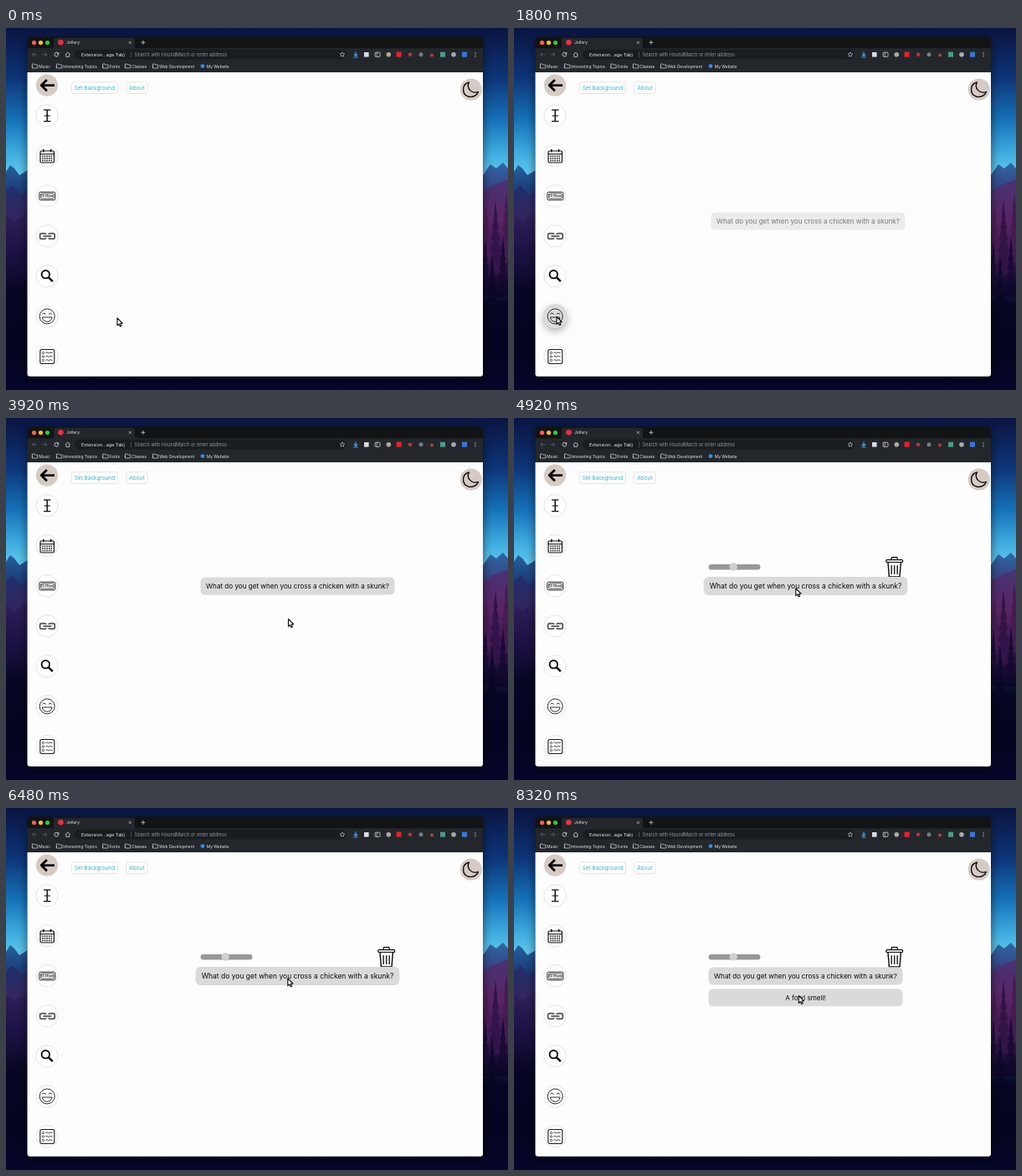
An HTML page with a canvas that plays this animation: 600 by 433 pixels, repeating every 8.36 s.

```html
<!DOCTYPE html>
<html lang="en">
<head>
<meta charset="utf-8">
<title>New tab board</title>
<style>
html, body { margin: 0; width: 100%; height: 100%; overflow: hidden; background: #04041f; }
canvas { display: block; width: 600px; height: 433px; }
</style>
</head>
<body>
<canvas id="stage"></canvas>
<script>
const W = 600, H = 433, LOOP = 8360, STEP = 40;
const dpr = window.devicePixelRatio || 1;
const canvas = document.getElementById('stage');
canvas.width = W * dpr;
canvas.height = H * dpr;
const screen = canvas.getContext('2d');
const backdrop = document.createElement('canvas');
backdrop.width = canvas.width;
backdrop.height = canvas.height;
let c = backdrop.getContext('2d');

const SIDE_X = 49, SMILE_Y = 345;
const FONT = 'Inter, "Liberation Sans", sans-serif';

// ---------- helpers ----------
const clamp = v => Math.max(0, Math.min(1, v));
const ease = v => { v = clamp(v); return v * v * (3 - 2 * v); };
const ramp = (t, from, to) => ease((t - from) / (to - from));

function rect(x, y, w, h, color) {
  c.fillStyle = color;
  c.fillRect(x, y, w, h);
}
function round(x, y, w, h, r) {
  c.beginPath();
  c.roundRect(x, y, w, h, r);
}
function fill(color) { c.fillStyle = color; c.fill(); }
function stroke(color, width) {
  c.strokeStyle = color;
  c.lineWidth = width;
  c.stroke();
}
function circle(x, y, r) {
  c.beginPath();
  c.arc(x, y, r, 0, Math.PI * 2);
}
function dot(x, y, r, color) { circle(x, y, r); fill(color); }
function path(points, color, width) {
  c.beginPath();
  for (let i = 0; i < points.length; i += 2) c.lineTo(points[i], points[i + 1]);
  stroke(color, width);
}
function poly(points, color) {
  c.beginPath();
  for (let i = 0; i < points.length; i += 2) c.lineTo(points[i], points[i + 1]);
  c.closePath();
  fill(color);
}
function text(str, x, y, size, color, align = 'left', weight = 400) {
  c.font = `${weight} ${size}px ${FONT}`;
  c.textAlign = align;
  c.textBaseline = 'alphabetic';
  c.fillStyle = color;
  c.fillText(str, x, y);
}
function shadow(color, blur, dy) {
  c.shadowColor = color;
  c.shadowBlur = blur * dpr;
  c.shadowOffsetY = dy * dpr;
}
function gradient(y0, y1, stops) {
  const g = c.createLinearGradient(0, y0, 0, y1);
  for (const [at, color] of stops) g.addColorStop((at - y0) / (y1 - y0), color);
  return g;
}

// ---------- wallpaper ----------
function pine(x, top, h, w, color) {
  const tiers = 6;
  for (let i = 0; i < tiers; i++) {
    const y = top + h * i / (tiers + 1), half = w * (i + 1.4) / tiers / 2;
    poly([x, y - 2, x + half, y + h / tiers * 1.2, x - half, y + h / tiers * 1.2], color);
  }
}
function wallpaper() {
  rect(0, 0, W, H, gradient(0, H, [
    [0, '#0a1440'], [60, '#0d3578'], [110, '#1672b8'], [150, '#3fade0'],
    [175, '#62c6ea'], [200, '#3a6aa8'], [H, '#04041f']]));
  for (let i = 0; i < 14; i++) {
    const x = (i * 7.3) % 25 + (i % 2) * 573;
    dot(x, 8 + (i * 37) % 80, 0.3, 'rgba(200,225,255,.6)');
  }
  poly([0, 172, 5, 164, 10, 168, 16, 176, 26, 170, 26, 300, 0, 300],
    gradient(162, 240, [[162, '#24639f'], [195, '#1c3c78'], [240, '#2c2560']]));
  poly([0, 196, 8, 188, 18, 200, 26, 194, 26, 320, 0, 320],
    gradient(188, 300, [[188, '#1f2f6b'], [225, '#33265f'], [300, '#120b36']]));
  poly([0, 224, 10, 231, 26, 220, 26, 350, 0, 350],
    gradient(220, 330, [[220, '#30205a'], [265, '#1d1245'], [330, '#05051f']]));
  poly([570, 176, 579, 163, 586, 168, 594, 161, 600, 168, 600, 300, 570, 300],
    gradient(160, 240, [[160, '#2b69a6'], [195, '#3a3f80'], [240, '#4a2866']]));
  poly([570, 196, 582, 188, 600, 181, 600, 320, 570, 320],
    gradient(181, 310, [[181, '#473475'], [230, '#5a2463'], [310, '#1a0c38']]));
  pine(574, 218, 70, 15, '#4a1d59');
  pine(598, 198, 90, 17, '#451a55');
  pine(585, 208, 95, 20, '#32144a');
  pine(573, 255, 70, 14, '#1e0d3a');
  pine(594, 252, 76, 17, '#190b35');
  pine(581, 274, 60, 14, '#110a2f');
  rect(0, 292, W, H - 292, gradient(292, H, [
    [292, 'rgba(6,5,32,0)'], [332, '#060523'], [380, '#04041f'], [H, '#05062a']]));
}

// ---------- browser ----------
function folder(x, y) {
  path([x, y + 5, x, y, x + 2.4, y, x + 3.2, y + 1, x + 6.4, y + 1, x + 6.4, y + 5, x, y + 5, x, y + 2], '#c6c9cc', 0.75);
}
function navIcons() {
  const y = 31.7;
  path([37, y, 31.7, y], '#62676c', 0.8);
  path([34, y - 2.3, 31.7, y, 34, y + 2.3], '#62676c', 0.8);
  path([43.5, y, 48.7, y], '#62676c', 0.8);
  path([46.4, y - 2.3, 48.7, y, 46.4, y + 2.3], '#62676c', 0.8);
  c.beginPath();
  c.arc(60.4, y, 2.4, 0.2, Math.PI * 1.75);
  stroke('#d4d7da', 0.85);
  poly([63.2, 28.7, 63.2, 31.5, 60.5, 31.5], '#d4d7da');
  path([71, 31.8, 73.8, 29, 76.6, 31.8], '#d4d7da', 0.85);
  path([71.9, 31.4, 71.9, 34.4, 75.7, 34.4, 75.7, 31.4], '#d4d7da', 0.8);
}
function star(x, y, r) {
  const pts = [];
  for (let i = 0; i <= 10; i++) {
    const a = -Math.PI / 2 + i * Math.PI / 5, d = i % 2 ? r * 0.45 : r;
    pts.push(x + Math.cos(a) * d, y + Math.sin(a) * d);
  }
  path(pts, '#d4d7da', 0.6);
}
function extensionIcons() {
  const y = 31.8;
  path([418, 28.6, 418, 33.2], '#4ba3f2', 1.2);
  path([415.8, 31.4, 418, 33.5, 420.2, 31.4], '#4ba3f2', 1.1);
  path([415.2, 35, 420.8, 35], '#4ba3f2', 0.9);
  rect(428, 29, 5.6, 5.6, '#d9dcdf');
  round(441.2, 29.2, 5.8, 5.2, 0.8);
  stroke('#d4d7da', 0.8);
  path([443.2, 29.2, 443.2, 34.4], '#d4d7da', 0.7);
  dot(457.3, y, 2.8, '#b3a7a0');
  round(466.6, 28.5, 6, 6.2, 0.8);
  fill('#e3222f');
  dot(483, y, 2.3, '#b9333b');
  dot(496, y, 2.5, '#777c82');
  dot(509, y + 0.6, 2, '#a7453f');
  rect(519, 28.7, 6, 6, '#4d9b86');
  dot(535, y, 2.8, '#a9adb1');
  rect(545, 28.7, 6, 6, '#3976d8');
  for (let i = -1; i <= 1; i++) dot(561, y + i * 2.1, 0.6, '#d4d7da');
}
function browser() {
  shadow('rgba(0,0,0,.55)', 12, 4);
  round(25.5, 10.5, 544.5, 406.3, 4);
  fill('#141619');
  shadow('transparent', 0, 0);

  c.save();
  round(25.5, 10.5, 544.5, 406.3, [4, 4, 3, 3]);
  c.clip();
  rect(25, 10, 546, 14.5, '#111315');
  round(57, 11.8, 97, 14, [3, 3, 0, 0]);
  fill('#23272b');
  rect(25, 24.2, 546, 29, '#23272b');
  round(82, 25.7, 325, 12, 6);
  fill('#1a1d20');
  rect(25, 53, 546, 365, '#fdfdfd');
  c.restore();

  ['#f95f56', '#fbbd2e', '#2bc840'].forEach((col, i) => dot(33.5 + i * 8, 17.6, 2.6, col));
  dot(65.4, 17.3, 3.3, '#e5304b');
  text('Jotlery', 72, 19.2, 4.9, '#e6e8ea');
  path([146.8, 15.9, 149.8, 18.9], '#d4d7da', 0.7);
  path([149.8, 15.9, 146.8, 18.9], '#d4d7da', 0.7);
  path([161.4, 17.3, 166.4, 17.3], '#d4d7da', 0.8);
  path([163.9, 14.8, 163.9, 19.8], '#d4d7da', 0.8);

  navIcons();
  text('Extension...age Tab)', 90, 33.7, 5.45, '#eceef0');
  rect(149.2, 28.5, 0.6, 6.6, '#666b70');
  text('Search with HoundMarch or enter address', 153.6, 33.7, 5.5, '#9097a0');
  star(402, 31.8, 3);
  extensionIcons();

  const marks = [['Music', 31], ['Interesting Topics', 60], ['Fonts', 115.3],
    ['Classes', 142], ['Web Development', 175]];
  for (const [label, x] of marks) {
    folder(x + 0.4, 43);
    text(label, x + 8.2, 47.5, 4.85, '#e3e6e8');
  }
  dot(235, 45.6, 2.4, '#2f8fe6');
  text('My Website', 239.8, 47.5, 4.85, '#e3e6e8');
}

// ---------- page ----------
function button(label, x, w) {
  round(x, 64.7, w, 13.8, 2.6);
  fill('#fff');
  stroke('#dadada', 0.7);
  text(label, x + w / 2, 74, 6.45, '#2fb4c6', 'center');
}
const icons = {
  105() {
    path([45, 98, 53.4, 98], '#111', 1.3);
    path([45, 111.6, 53.4, 111.6], '#111', 1.3);
    path([49.2, 98, 49.2, 111.6], '#111', 1.5);
    path([45.6, 105, 52.8, 105], '#111', 1.1);
  },
  153() {
    round(41, 147, 16.4, 14, 1.4);
    stroke('#111', 1.2);
    path([41, 150.8, 57.4, 150.8], '#111', 1.1);
    for (const x of [44.8, 53.6]) path([x, 144.9, x, 148.4], '#111', 1.5);
    for (let r = 0; r < 3; r++)
      for (let k = 0; k < 5; k++) rect(43.1 + k * 2.6, 152.6 + r * 2.6, 1.6, 1.6, '#222');
  },
  201() {
    round(39.8, 196.2, 19, 9.6, 1.4);
    stroke('#222', 1);
    round(41.6, 198, 15.4, 6, 0.8);
    stroke('#222', 0.8);
    text('12:00 pm', 49.3, 202.3, 3.2, '#000', 'center', 700);
  },
  249() {
    round(40.6, 245.8, 7.2, 6.4, 2);
    stroke('#636363', 2);
    round(51, 245.8, 7.2, 6.4, 2);
    stroke('#636363', 2);
    rect(45.4, 247.1, 8, 3.8, '#fff');
    path([44.4, 249, 54.4, 249], '#636363', 1.9);
  },
  297() {
    circle(47.3, 294.7, 4.7);
    stroke('#0a0a0a', 1.9);
    path([50.9, 298.3, 55.8, 303.2], '#0a0a0a', 2.5);
  },
  345() {
    circle(49.2, 344.9, 9);
    stroke('#2a2a2a', 1);
    for (const x of [45.5, 52.9]) {
      c.beginPath();
      c.arc(x, 343.2, 2, Math.PI * 1.1, Math.PI * 1.9);
      stroke('#222', 0.95);
    }
    c.beginPath();
    c.moveTo(43.4, 346);
    c.lineTo(55, 346);
    c.bezierCurveTo(54.5, 353, 43.9, 353, 43.4, 346);
    c.closePath();
    stroke('#222', 0.95);
  },
  393() {
    round(40.8, 384.5, 17, 17, 2.2);
    stroke('#1c1c1c', 1.1);
    for (let i = 0; i < 3; i++) {
      const y = 388.6 + i * 4.4;
      circle(44.4, y, 1.2);
      stroke('#222', 0.75);
      path([47.3, y, 49, y - 0.8, 50.7, y + 0.5, 52.4, y - 0.5, 55.6, y], '#222', 0.85);
    }
  }
};
function sideIcon(y) {
  circle(SIDE_X, y - 0.2, 13.2);
  fill('#fff');
  stroke('#dedede', 0.8);
  icons[y]();
}
function page() {
  dot(SIDE_X, 68.6, 13.1, '#d6cbc4');
  path([58, 68.6, 43, 68.6], '#050505', 2.7);
  path([48.9, 62, 42.2, 68.6, 48.9, 75.2], '#050505', 2.8);
  dot(555.8, 73.5, 13.1, '#d6cbc4');
  c.beginPath();
  c.moveTo(553.4, 65);
  c.bezierCurveTo(544.5, 67, 544, 80, 553.5, 82.2);
  c.bezierCurveTo(558.5, 83.2, 563, 80.4, 564.4, 76.4);
  c.bezierCurveTo(556.5, 79.2, 549.8, 72, 553.4, 65);
  c.closePath();
  stroke('#0c0c0c', 1.4);
  button('Set Background', 78.4, 55);
  button('About', 143.8, 25.3);
  for (const y of Object.keys(icons)) sideIcon(+y);
}

// ---------- moving parts ----------
function smileHover(k) {
  if (k <= 0) return;
  c.save();
  c.globalAlpha = k;
  shadow('rgba(0,0,0,.28)', 9, 4);
  dot(SIDE_X + 0.2, SMILE_Y - 0.4, 14.4, '#dcdcdc');
  shadow('transparent', 0, 0);
  icons[SMILE_Y]();
  c.restore();
}
function bubble(label, x, y, alpha, scale) {
  if (alpha <= 0) return;
  c.save();
  c.globalAlpha = alpha;
  c.translate(x, y);
  c.scale(scale, scale);
  round(-116, -10.5, 232, 21, 5.5);
  fill('#dadada');
  text(label, 0, 2.8, 8.1, '#0a0a0a', 'center');
  c.restore();
}
function tools(alpha) {
  if (alpha <= 0) return;
  c.save();
  c.globalAlpha = alpha;
  round(232.6, 175, 61.8, 6.4, 3.2);
  fill('#989898');
  dot(262.2, 178, 4.7, '#d0d0d0');
  const ink = '#0c0c0c';
  path([450.6, 169.6, 451.6, 166.7, 457.8, 166.7, 458.8, 169.6], ink, 1.3);
  round(444.7, 169.6, 20, 2.9, 1.3);
  stroke(ink, 1.2);
  path([447, 172.8, 448.4, 189.9, 461, 189.9, 462.4, 172.8], ink, 1.4);
  for (const x of [451.2, 454.7, 458.2]) path([x, 176.2, x, 187], ink, 1.3);
  c.restore();
}
// time, x, y of the pointer tip
const TRACK = [
  [0, 133, 347], [120, 133, 347], [720, 51, 345.5], [1880, 51, 345.5],
  [2600, 200, 328.8], [3400, 246, 312], [3900, 337.5, 240.5], [4020, 337.5, 240.5],
  [4440, 336.8, 203.8], [7700, 336.8, 203.8], [8200, 340.3, 224.5], [LOOP, 340.3, 224.5]
];
function pointer(t) {
  const i = Math.max(1, TRACK.findIndex(k => k[0] > t));
  const [t0, x0, y0] = TRACK[i - 1], [t1, x1, y1] = TRACK[i];
  const k = ramp(t, t0, t1);
  c.save();
  c.translate(x0 + (x1 - x0) * k, y0 + (y1 - y0) * k);
  c.beginPath();
  [[0, 0], [0, 8.8], [2, 7], [3.4, 10], [4.9, 9.3], [3.6, 6.4], [6.2, 6.2]].forEach(p => c.lineTo(...p));
  c.closePath();
  fill('#fff');
  stroke('#0a0a0a', 1.1);
  c.restore();
}
function scene(t) {
  smileHover(ramp(t, 560, 720) * (1 - ramp(t, 2020, 2160)));

  const hoverIn = ramp(t, 4280, 4440);
  const hover = hoverIn * (1 - ramp(t, 7880, 8040));
  const drift = Math.exp((1800 - t) / 320);
  const shown = ramp(t, 1640, 1960);
  tools(hoverIn);
  bubble('What do you get when you cross a chicken with a skunk?',
    348.5 + 2.9 * drift, 201 + 30 * drift, shown, 1 + 0.05 * hover);
  bubble('A fowl smell!', 348.5, 226.8, ramp(t, 6480, 6720), 1);
  pointer(t);
}

c.scale(dpr, dpr);
c.lineJoin = 'round';
wallpaper();
browser();
page();
c = screen;
c.lineJoin = 'round';

const start = performance.now();
function frame() {
  const now = (performance.now() - start) % LOOP;
  c.setTransform(1, 0, 0, 1, 0, 0);
  c.drawImage(backdrop, 0, 0);
  c.setTransform(dpr, 0, 0, dpr, 0, 0);
  scene(Math.floor(now / STEP) * STEP);
  requestAnimationFrame(frame);
}
frame();
</script>
</body>
</html>
```
